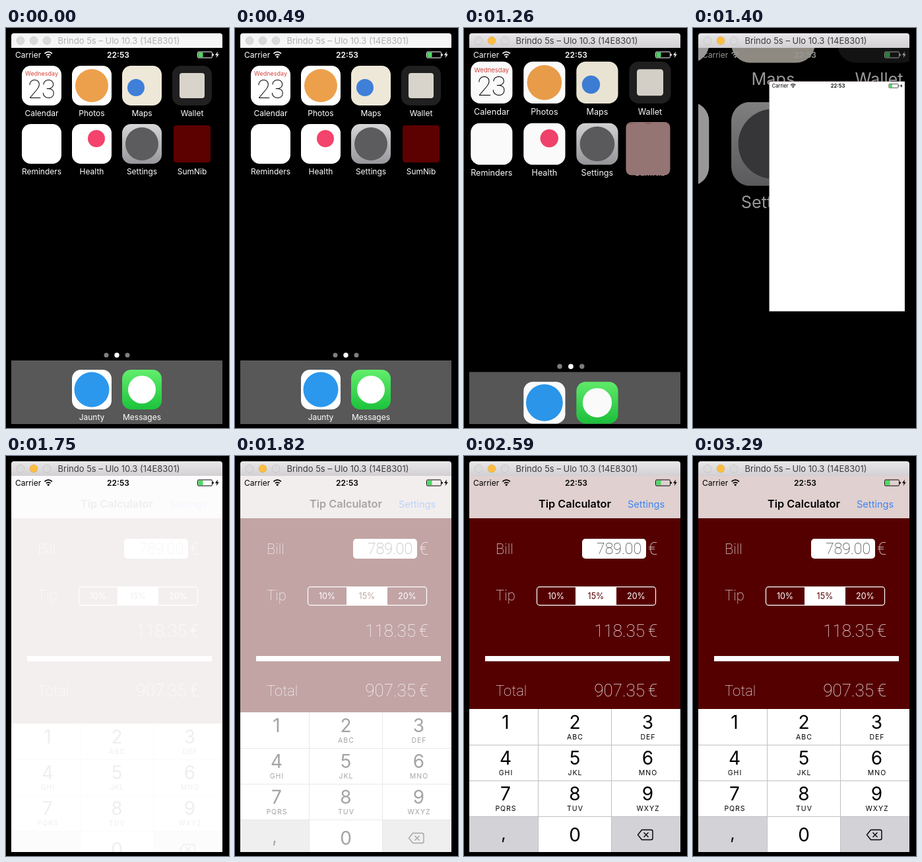
Animation, 338 px wide and 604 px high, one loop 3430 ms. Source, as an HTML page:

```html
<!DOCTYPE html>
<html lang="en">
<head>
<meta charset="utf-8">
<title>Tip calculator launch</title>
<style>
  html, body { margin: 0; width: 100%; height: 100%; overflow: hidden; background: #000; }
  svg { display: block; width: 338px; height: 604px; font-family: Inter, Roboto, sans-serif; }
  .thin { font-family: Roboto, Inter, sans-serif; font-weight: 200; }
  .mid { text-anchor: middle; }
  .end { text-anchor: end; }
</style>
</head>
<body>
<svg viewBox="0 0 338 604">
  <defs>
    <clipPath id="screen"><rect x="8" y="30" width="320" height="568"/></clipPath>
    <clipPath id="frame"><rect id="frameBox"/></clipPath>
    <linearGradient id="bar" x2="0" y2="1">
      <stop stop-color="#e9e7e9"/><stop offset="1" stop-color="#d2d0d2"/>
    </linearGradient>
    <linearGradient id="green" x2="0" y2="1">
      <stop stop-color="#62ee6c"/><stop offset="1" stop-color="#1cc33c"/>
    </linearGradient>
    <linearGradient id="grey" x2="0" y2="1">
      <stop stop-color="#d6d6d8"/><stop offset="1" stop-color="#98989c"/>
    </linearGradient>
    <g id="status" fill="currentColor" font-size="12">
      <text x="14" y="45">Carrier</text>
      <g fill="none" stroke="currentColor" stroke-width="1.8">
        <path d="M58.5 38.6a8 8 0 0 1 11.4 0M60.9 41.2a4.6 4.6 0 0 1 6.6 0"/>
      </g>
      <path d="M64.2 45.4l-2-2.2a2.8 2.8 0 0 1 4 0z"/>
      <text x="170" y="45" class="mid" font-weight="600">22:53</text>
      <rect x="290.5" y="36" width="22" height="9" rx="1.5" fill="none" stroke="currentColor"/>
      <rect x="291.5" y="37" width="7" height="7" fill="#4cd964"/>
      <rect x="313.3" y="38.8" width="1.5" height="3.4" rx=".7"/>
      <path d="M321 35.5l-4 5.6h2.6l-1 4.2 4.2-5.8h-2.6z"/>
    </g>
  </defs>

  <rect width="338" height="604"/>

  <g clip-path="url(#screen)">
    <g id="home">
      <g id="grid"></g>
      <use href="#status" color="#fff"/>
    </g>
    <g id="win">
      <rect id="tile" fill="#3c0000"/>
      <rect id="sheet" fill="#fff"/>
      <g clip-path="url(#frame)">
        <g id="app">
          <g id="content">
            <rect x="8" y="94" width="320" height="504" fill="#550000"/>
            <rect x="8" y="30" width="320" height="64" fill="#e0d0d0"/>
            <text x="168" y="78" class="mid" font-size="16.3" font-weight="600">Tip Calculator</text>
            <text x="248" y="77.5" font-size="14.6" fill="#3d86f0">Settings</text>
            <g class="thin" fill="#fff" font-size="22">
              <text x="48" y="148">Bill</text>
              <text x="48" y="218">Tip</text>
              <text x="48" y="362">Total</text>
              <g font-size="26">
                <text x="279" y="149">€</text>
                <text x="274" y="273" class="end">118.35</text>
                <text x="279" y="273">€</text>
                <text x="274" y="363" class="end">907.35</text>
                <text x="279" y="363">€</text>
              </g>
            </g>
            <rect x="179" y="125" width="97" height="30" rx="5" fill="#fff"/>
            <text x="269" y="148" class="thin end" font-size="23" fill="#222">789.00</text>
            <rect x="110.5" y="197.7" width="180" height="27.6" rx="4" fill="none" stroke="#fff" stroke-width="1.2"/>
            <rect x="169" y="197.5" width="62" height="28" fill="#fff"/>
            <g class="mid" font-size="12.5" fill="#fff">
              <text x="139.5" y="216">10%</text>
              <text x="200" y="216" fill="#550000">15%</text>
              <text x="261" y="216">20%</text>
            </g>
            <rect x="32" y="302" width="280" height="8" fill="#fff"/>
            <g id="pad">
              <rect x="8" y="382" width="320" height="216" fill="#fff"/>
              <path d="M8 544h105v54H8zM223 544h105v54H223z" fill="#d2d2d7"/>
              <path d="M8 436.5h320M8 490.5h320M8 544.5h320M112.5 382v216M223.5 382v216" stroke="#c0c0c5"/>
              <g id="keys" class="mid"></g>
              <path d="M263.5 572l6-7.5h14q2.5 0 2.5 2.5v10q0 2.5-2.5 2.5h-14zM272.5 568.5l7 7m0-7l-7 7" fill="none" stroke="#000" stroke-width="1.4" stroke-linejoin="round"/>
            </g>
          </g>
          <use href="#status"/>
        </g>
      </g>
    </g>
  </g>

  <path id="titleBar" d="M8 30V12q0-4 4-4H324q4 0 4 4V30z"/>
  <g stroke="#000" stroke-opacity=".08">
    <circle cx="22" cy="19" r="6" fill="#dadada"/>
    <circle id="amber" cx="42" cy="19" r="6"/>
    <circle cx="62" cy="19" r="6" fill="#dadada"/>
  </g>
  <text id="title" x="171" y="24" class="mid" font-size="13">Brindo 5s – Ulo 10.3 (14E8301)</text>
</svg>

<script>
const $ = id => document.getElementById(id);
const set = (id, attrs) => {
  for (const k in attrs) $(id).setAttribute(k, attrs[k]);
};
const clamp = x => Math.min(1, Math.max(0, x));
const smooth = (t, start, length) => {
  const x = clamp((t - start) / length);
  return x * x * (3 - 2 * x);
};
const mix = (a, b, p) => a + (b - a) * p;

// Home screen: icons are drawn around their own centre
const dot = (r, fill, x = 0, y = 0) => `<circle cx="${x}" cy="${y}" r="${r}" fill="${fill}"/>`;
const box = (s, fill, rx) => `<rect x="${-s / 2}" y="${-s / 2}" width="${s}" height="${s}" rx="${rx}" fill="${fill}"/>`;
const icon = (x, y, name, fill, art = '', size = 60, rx = 13.5) =>
  `<g transform="translate(${x} ${y})">${box(size, fill, rx)}${art}
   <text y="46" class="mid" font-size="12" fill="#fff">${name}</text></g>`;

const date = `<text y="-15" class="mid" font-size="9" fill="#d4433d">Wednesday</text>
  <text y="19" class="mid thin" font-size="38">23</text>`;

$('grid').innerHTML =
  icon(54, 87, 'Calendar', '#fff', date) +
  icon(130, 87, 'Photos', '#fff', dot(25, '#eda04c')) +
  icon(206, 87, 'Maps', '#eee8d8', dot(13, '#3f7fd8', -9, 3)) +
  icon(282, 87, 'Wallet', '#202021', box(38, '#d8d4cb', 4)) +
  icon(54, 175, 'Reminders', '#fff') +
  icon(130, 175, 'Health', '#fff', dot(13, '#f4436c', 7, -8)) +
  icon(206, 175, 'Settings', 'url(#grey)', dot(25, '#5c5c5f')) +
  `<g id="tapped">${icon(282, 175, 'SumNib', '#5c0000', '', 56, 4)}</g>` +
  '<rect x="8" y="502" width="320" height="96" fill="#585858"/>' +
  icon(130, 546, 'Jaunty', '#fff', dot(26.5, '#2b98ee')) +
  icon(206, 546, 'Messages', 'url(#green)', dot(21, '#fff')) +
  dot(3.5, '#808080', 152, 494) + dot(3.7, '#fff', 168, 494) + dot(3.5, '#808080', 184, 494);

// Number pad
const letters = ['', 'ABC', 'DEF', 'GHI', 'JKL', 'MNO', 'PQRS', 'TUV', 'WXYZ'];
const columns = [63, 168, 278.5];
$('keys').innerHTML = letters.map((s, i) => {
  const x = columns[i % 3], y = 412 + 54 * Math.floor(i / 3);
  return `<text x="${x}" y="${y}" font-size="28">${i + 1}</text>
    <text x="${x + .5}" y="${y + 15.5}" font-size="10.5" letter-spacing="1">${s}</text>`;
}).join('') +
  '<text x="168" y="581.5" font-size="28">0</text><text x="60" y="579" font-size="26">,</text>';

function draw(t) {
  const active = t >= 1050;
  set('titleBar', { fill: active ? 'url(#bar)' : '#f6f6f6' });
  set('amber', { fill: active ? '#fdbd40' : '#dadada' });
  set('title', { fill: active ? '#3c3c3c' : '#b0b0b0' });

  // The tapped icon grows into the app while the home screen zooms around it
  const p = smooth(t, 1229, 317);
  const zoom = mix(1, 2.99, p);
  set('home', { opacity: 1 - .72 * p });
  set('grid', { transform: `translate(282 175) scale(${zoom}) translate(-282 -175)` });
  set('tapped', { opacity: clamp(1 - 4 * p) });

  const x = mix(252, 8, p), y = mix(145, 30, p);
  const width = mix(60, 320, p), height = mix(67, 568, p);
  const shape = { x, y, width, height, rx: 9 * clamp(1 - 3 * p) };
  const cover = clamp(p * 17);
  set('win', { visibility: p > 0 ? 'visible' : 'hidden' });
  ['tile', 'sheet', 'frameBox'].forEach(id => set(id, shape));
  set('sheet', { opacity: cover });
  set('app', {
    opacity: cover,
    transform: `translate(${x} ${y}) scale(${width / 320}) translate(-8 -30)`
  });

  // Content fades in as the number pad settles
  set('content', { opacity: smooth(t, 1710, 275) });
  const drop = Math.round(22 * Math.exp((1750 - t) / 50));
  set('pad', { transform: `translate(0 ${Math.min(216, drop)})` });
}

const LOOP = 3430, STEP = 70;
function tick() {
  const t = performance.now() % LOOP;
  draw(Math.floor(t / STEP) * STEP);
  requestAnimationFrame(tick);
}
tick();
</script>
</body>
</html>
```
